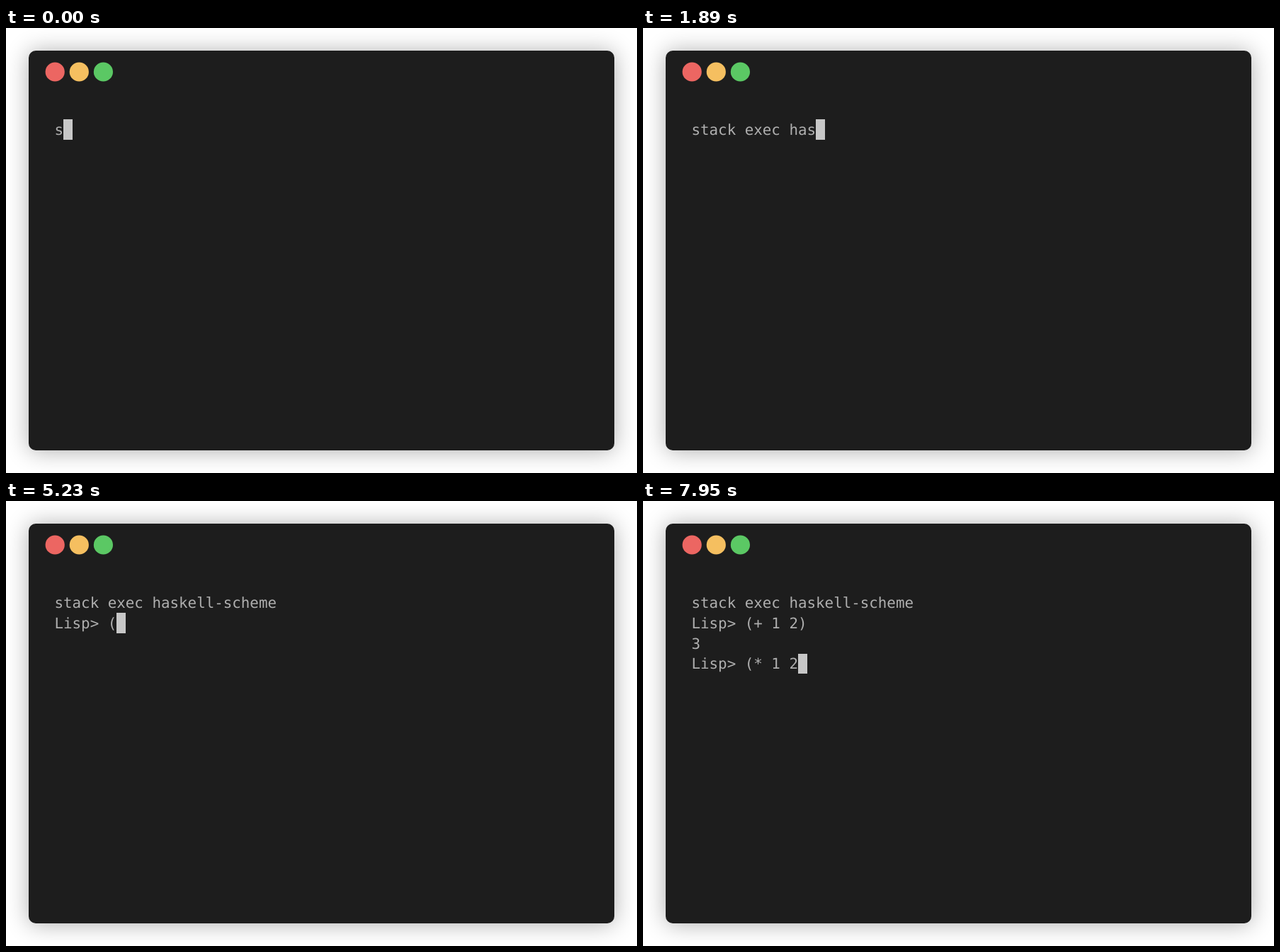
These frames come from a looping animation (891x629 px, 8000 ms). An HTML page:

```html
<!DOCTYPE html>
<html lang="en">
<head>
<meta charset="utf-8">
<title>Terminal session</title>
<style>
  html, body { margin: 0; width: 100%; height: 100%; overflow: hidden; background: #fff; }
  .window {
    position: absolute; left: 32px; top: 32px; width: 827px; height: 565px;
    border-radius: 10px; background: #1d1d1d;
    box-shadow: 0 1px 32px rgba(0, 0, 0, .32);
  }
  svg { position: absolute; left: 0; top: 0; width: 891px; height: 629px; }
  text {
    font: 20.84px "DejaVu Sans Mono", monospace;
    fill: #afafaf; white-space: pre; text-rendering: geometricPrecision;
  }
</style>
</head>
<body>
<div class="window"></div>
<svg viewBox="0 0 891 629">
  <circle cx="69.2" cy="62" r="13.6" fill="#ec6662"/>
  <circle cx="103.3" cy="62" r="13.6" fill="#f5bf60"/>
  <circle cx="137.4" cy="62" r="13.6" fill="#5bc864"/>
  <g id="lines"></g>
  <rect id="cursor" fill="#c7c7c7"/>
</svg>
<script>
const LOOP = 8000, LEFT = 68.5, TOP = 129.4, CELL = 12.547, LINE = 28.7, BASELINE = 21.9;

const output = (time, text) => [{ time, text }];
const typed = (text, times) => [...text].map((char, i) => ({ time: times[i], text: char }));

const events = [
  ...typed("stack exec haskell-scheme", [
    0, 200, 270, 550, 800, 890, 970, 1180, 1330, 1440, 1550, 1760, 1830,
    1890, 2020, 2130, 2240, 2340, 2550, 2630, 2790, 2880, 2970, 3080, 3140]),
  ...output(3300, "\n"),
  ...output(3840, "Lisp> "),
  ...typed("(+ 1 2)", [5230, 5290, 5440, 5540, 5650, 5900, 6170]),
  ...output(6400, "\n3\nLisp> "),
  ...typed("(* 1 2", [7000, 7520, 7630, 7740, 7840, 7950]),
];

const cursor = document.getElementById("cursor");
const rows = Array.from({ length: 4 }, (_, i) => {
  const row = document.createElementNS("http://www.w3.org/2000/svg", "text");
  row.setAttribute("x", LEFT);
  row.setAttribute("y", TOP + BASELINE + i * LINE);
  return document.getElementById("lines").appendChild(row);
});

function setBox(el, left, top, right, bottom) {
  [left, top, right, bottom] = [left, top, right, bottom].map(Math.round);
  el.setAttribute("x", left);
  el.setAttribute("y", top);
  el.setAttribute("width", right - left);
  el.setAttribute("height", bottom - top);
}

let shown;
function draw(time) {
  const screen = events.filter(e => e.time <= time).map(e => e.text).join("");
  if (screen === shown) return;
  shown = screen;
  const lines = screen.split("\n");
  rows.forEach((row, i) => { row.textContent = lines[i] || ""; });
  const x = LEFT + lines.at(-1).length * CELL;
  const y = TOP + (lines.length - 1) * LINE;
  setBox(cursor, x, y, x + CELL, y + LINE);
}

const start = performance.now();
function tick() {
  draw((performance.now() - start) % LOOP);
  requestAnimationFrame(tick);
}
tick();
</script>
</body>
</html>
```
